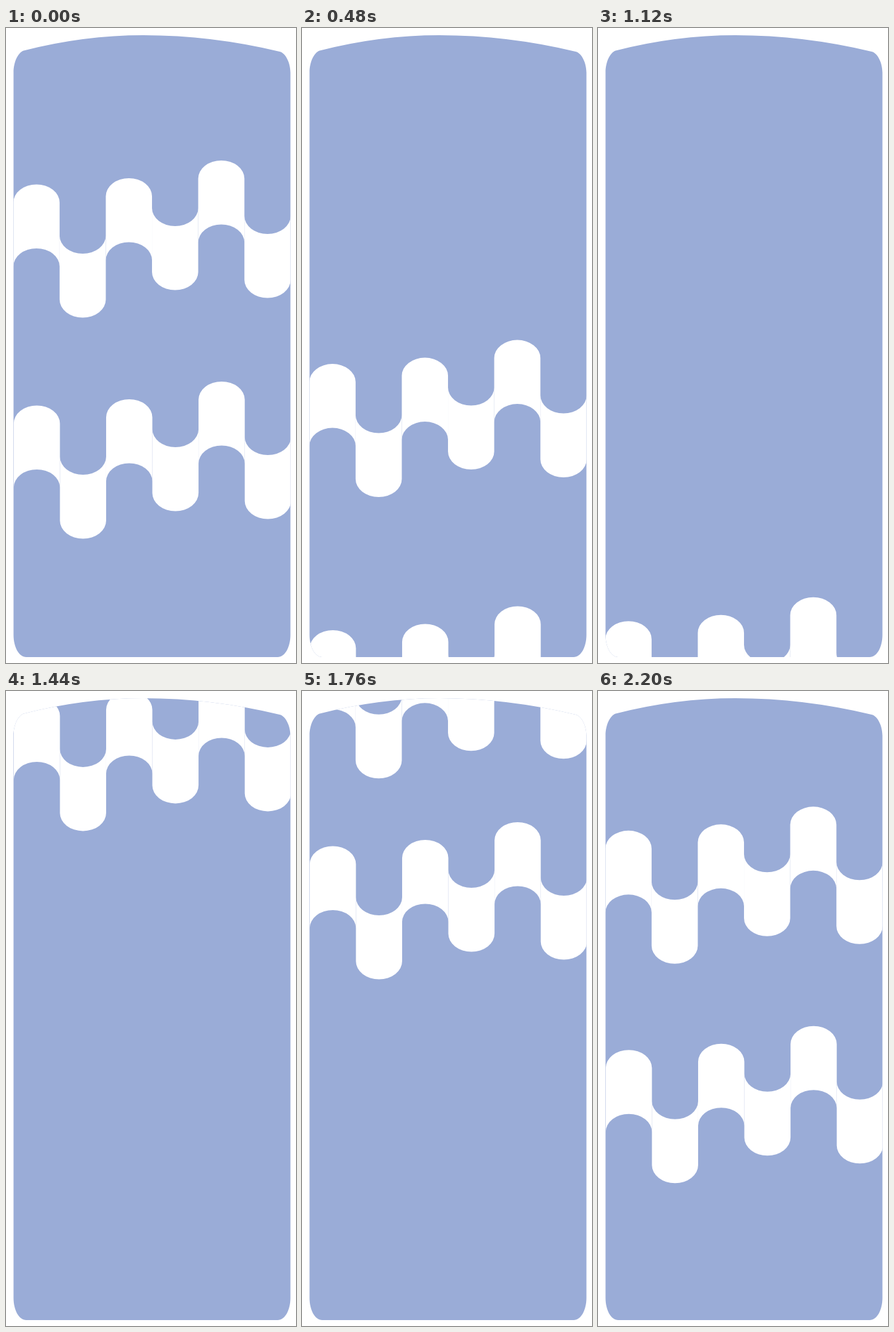
Write an HTML page with a canvas that moves like this. It is 443x968 px and loops after 2.24 s.

```html
<!DOCTYPE html>
<html lang="en">
<head>
<meta charset="utf-8">
<title>Falling waves</title>
<style>
html, body { margin: 0; width: 100%; height: 100%; overflow: hidden; background: #fff; }
canvas { display: block; }
</style>
</head>
<body>
<canvas id="stage" width="443" height="968"></canvas>
<script>
const ctx = document.getElementById('stage').getContext('2d');
const LOOP = 2240, STEP = 40;
const COL = 70.58, RY = 27.5, THICK = 97.5;
// Tip of each column: odd columns arch up, even ones hang down.
const TIPS = [0, 105.5, -9.5, 63.5, -36.5, 75.5];

const panel = new Path2D(
  'M27 34.5 Q118.5 11 210 11 Q314 11 418 36 ' +
  'C427 38 434.5 53 434.5 68 V925 C434.5 944 426 959 415 959 ' +
  'H31 C20 959 11.5 944 11.5 925 V68 C11.5 51 19 37 27 34.5 Z');

function column(x, tip, up) {
  const rx = COL / 2, cx = x + rx;
  const cy = up ? tip + RY : tip - RY;
  ctx.beginPath();
  ctx.ellipse(cx, cy, rx, RY, 0, Math.PI, 0, !up);
  ctx.lineTo(x + COL, cy + THICK);
  ctx.ellipse(cx, cy + THICK, rx, RY, 0, 0, Math.PI, up);
  ctx.closePath();
  ctx.fill();
}

function band(x, y) {
  TIPS.forEach((tip, i) => column(x + i * COL, y + tip, i % 2 === 0));
}

function slowY(t) {
  if (t >= 1500) return 238.5 + 0.642 * (t - LOOP);
  const late = Math.max(0, t - 800);
  return 238.5 + 0.57 * t + 0.000266 * late * late;
}

function fastY(t) {
  return t < 900 ? 575.5 + 0.7135 * t : 575.5 + 0.7063 * (t - LOOP);
}

function draw(t) {
  ctx.fillStyle = '#fff';
  ctx.fillRect(0, 0, 443, 968);
  ctx.fillStyle = '#9aacd7';
  ctx.fill(panel);
  ctx.save();
  ctx.clip(panel);
  ctx.fillStyle = '#fff';
  band(11.3, slowY(t));
  band(11.8, fastY(t));
  ctx.restore();
}

const start = performance.now();
function tick() {
  const t = (performance.now() - start) % LOOP;
  draw(Math.floor(t / STEP) * STEP);
  requestAnimationFrame(tick);
}
tick();
</script>
</body>
</html>
```
